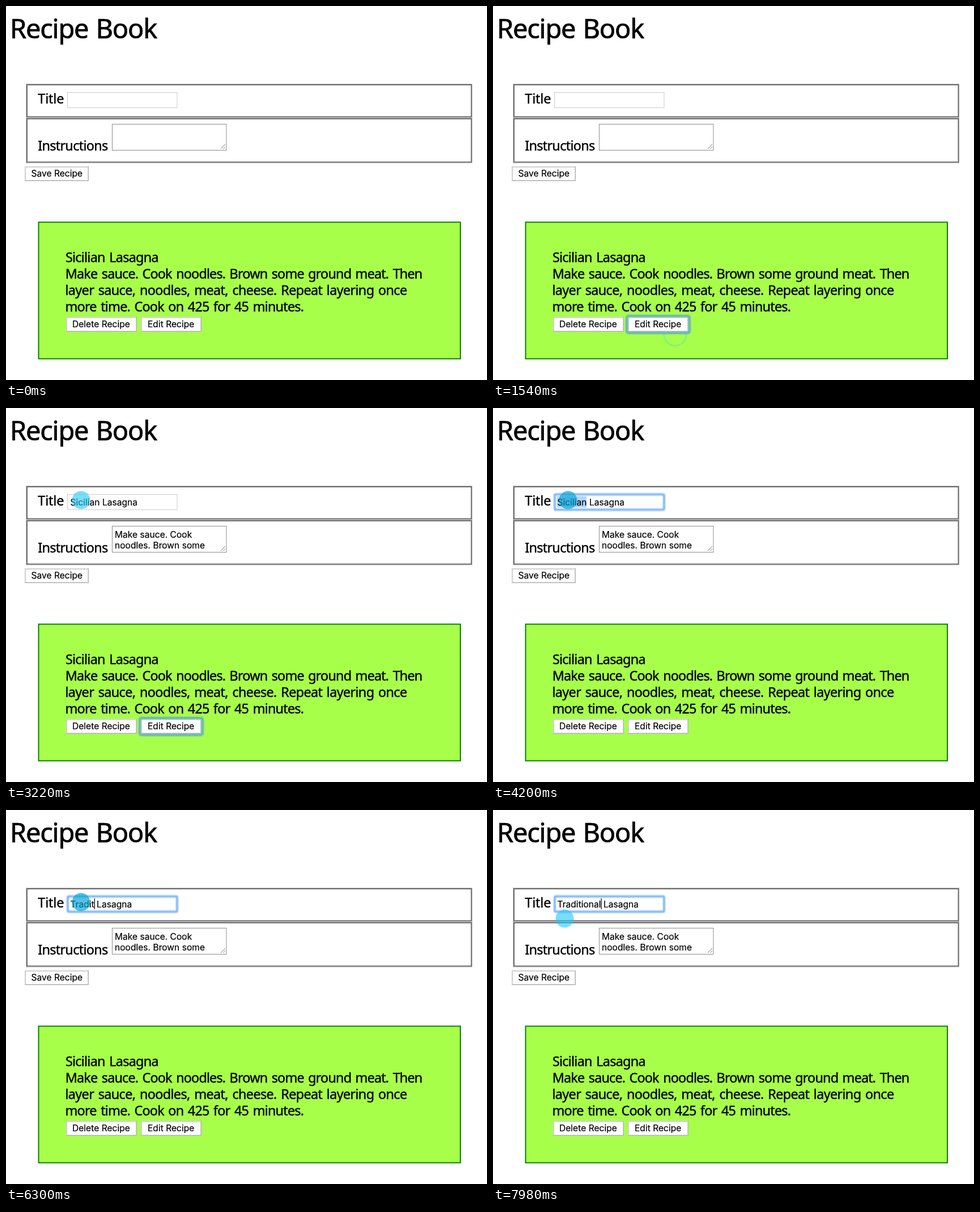
An HTML page for the animation above (8000 ms loop, 849 by 660 pixels).

```html
<!DOCTYPE html>
<html lang="en">
<head>
<meta charset="utf-8">
<title>Recipe Book</title>
<style>
  html, body { margin: 0; width: 100%; height: 100%; overflow: hidden; background: #fff; }
  svg { display: block; width: 100vw; height: 100vh; }
  text { white-space: pre; fill: #000; stroke: #000; stroke-width: .4; }
  .page { font: 23.5px "Noto Sans", "Open Sans", sans-serif; word-spacing: .095em; }
  .page .head { font-size: 47px; letter-spacing: -1.25px; stroke-width: .7; }
  .ui { font: 15.6px Inter, Roboto, sans-serif; }
  .ui text { stroke-width: .2; }
  .box { fill: #fff; stroke: #6c6c6c; stroke-width: 2; }
  .lip { fill: none; stroke: #c4c4c4; }
  .btn rect { fill: #fff; stroke: #d0d0d0; stroke-width: 2; }
  .btn path { fill: none; stroke: #b4b4b4; }
  .glow { fill: none; filter: blur(.9px); }
</style>
</head>
<body>
<svg viewBox="0 0 849 660">
  <rect class="lip" x="35.5" y="137.5" width="787" height="59.5"/>
  <rect class="box" x="37" y="139" width="784.5" height="56.5"/>
  <rect class="lip" x="35.5" y="197.5" width="787" height="79.5"/>
  <rect class="box" x="37" y="199" width="784.5" height="76.5"/>
  <rect x="57.5" y="381.5" width="744.5" height="241" fill="#a7ff4a" stroke="#078307" stroke-width="2"/>

  <g class="page">
    <text class="head" x="7" y="56.5">Recipe Book</text>
    <text x="56.3" y="172" letter-spacing="-.2">Title</text>
    <text x="56.2" y="254.5" letter-spacing="-.75">Instructions</text>
    <text x="105" y="452" letter-spacing="-.8">Sicilian Lasagna</text>
    <text x="104.7" y="481" letter-spacing="-.91">Make sauce. Cook noodles. Brown some ground meat. Then</text>
    <text x="104.5" y="509.500" letter-spacing="-.71">layer sauce, noodles, meat, cheese. Repeat layering once</text>
    <text x="104.5" y="538.500" letter-spacing="-.86">more time. Cook on 425 for 45 minutes.</text>
  </g>

  <rect x="108.5" y="152.5" width="193.5" height="27" fill="#fff" stroke="#999" stroke-dasharray="1 1"/>
  <rect x="187.5" y="208.5" width="201.5" height="46" fill="#fff" stroke="#8c8c8c"/>
  <path d="M379 252l8-8M383.5 252l3.5-3.5" stroke="#777"/>
  <circle id="ripple" cx="321.5" cy="580" fill="none" stroke="#35d8dc" stroke-width="3"/>

  <g class="ui">
    <g id="buttons"></g>
    <rect id="editGlow" class="glow" x="236" y="547" width="111" height="30" rx="3" stroke="#62b3bd" stroke-width="4"/>
    <rect id="titleGlow" class="glow" x="109" y="152.5" width="193" height="27" rx="2" stroke="#7fb7fa" stroke-width="4"/>
    <rect id="selection" x="113" y="156" width="52" height="19.5" fill="#b3d5fb"/>
    <text id="title" x="113.5" y="172"></text>
    <g id="instructions">
      <text x="192" y="229">Make sauce. Cook</text>
      <text x="192" y="248">noodles. Brown some</text>
    </g>
  </g>
  <rect id="caret" y="156" width="1.2" height="19"/>
  <circle id="pointer" r="16"/>
</svg>
<script>
const LOOP = 8000, STEP = 140;
const el = id => document.getElementById(id);
const set = (id, attrs) => { for (const k in attrs) el(id).setAttribute(k, attrs[k]); };
const show = (id, on) => set(id, { visibility: on ? 'visible' : 'hidden' });

function button(label, x, y, w, h, textX) {
  el('buttons').innerHTML += `<g class="btn">
    <rect x="${x + 1}" y="${y + 1}" width="${w - 2}" height="${h - 2}"/>
    <path d="M${x} ${y + h - .5}h${w - .5}v${-h}"/>
    <text x="${textX}" y="${y + h - 7.7}">${label}</text></g>`;
}
button('Save Recipe', 33, 283, 113, 26, 44.5);
button('Delete Recipe', 106, 548.5, 125, 26.5, 117);
button('Edit Recipe', 238, 548.5, 107, 26.5, 250);

// pointer path: time, x, y
const path = [
  [420, 716, 650], [560, 558, 612], [700, 447, 586], [840, 380, 569], [980, 358, 564],
  [1120, 358, 564], [1260, 321, 564], [2240, 321, 564], [2380, 260, 380], [2520, 210, 225],
  [2660, 210, 225], [3220, 132.5, 162.5], [7840, 132.5, 162.5], [7980, 126.5, 191.5]
];
// typed so far: time, number of letters
const word = 'Traditional';
const keys = [[5320, 1], [5460, 2], [5740, 3], [6020, 4], [6160, 5], [6300, 6],
  [6440, 8], [6720, 9], [6860, 10], [7000, 11]];

function position(t) {
  const i = path.findIndex(p => p[0] >= t);
  if (i < 0) return path[path.length - 1].slice(1);
  if (i === 0) return path[0].slice(1);
  const [a, b] = [path[i - 1], path[i]], u = (t - a[0]) / (b[0] - a[0]);
  return [a[1] + (b[1] - a[1]) * u, a[2] + (b[2] - a[2]) * u];
}

function draw(now) {
  const t = Math.floor((now % LOOP) / STEP) * STEP;
  const within = (a, b) => t >= a && t < b;

  const [cx, cy] = position(t);
  const pressed = within(1400, 1540) || within(3640, 7980);
  set('pointer', { cx, cy, fill: pressed ? 'rgba(0,165,215,.67)' : 'rgba(33,200,250,.6)' });
  show('pointer', t >= 420 && !within(1540, 1820));

  set('ripple', { r: t < 1680 ? 19.5 : 21, opacity: t < 1680 ? .32 : .12 });
  show('ripple', within(1540, 1820));
  show('editGlow', within(1400, 3640));
  show('titleGlow', t >= 3640);
  show('selection', within(3920, 5320));

  const filled = t >= 1680, typing = t >= 5320;
  show('instructions', filled);
  const typed = keys.reduce((n, [at, count]) => t >= at ? count : n, 0);
  const title = el('title');
  const first = typing ? word.slice(0, typed) : 'Sicilian';
  const text = filled ? first + ' Lasagna' : '';
  if (title.textContent !== text) title.textContent = text;

  if (typing) set('caret', { x: 113.5 + title.getSubStringLength(0, typed) });
  show('caret', typing && !within(7420, 7980));
}

let start;
function tick(now) {
  start ??= now;
  draw(now - start);
  requestAnimationFrame(tick);
}
draw(0);
requestAnimationFrame(tick);
</script>
</body>
</html>
```
